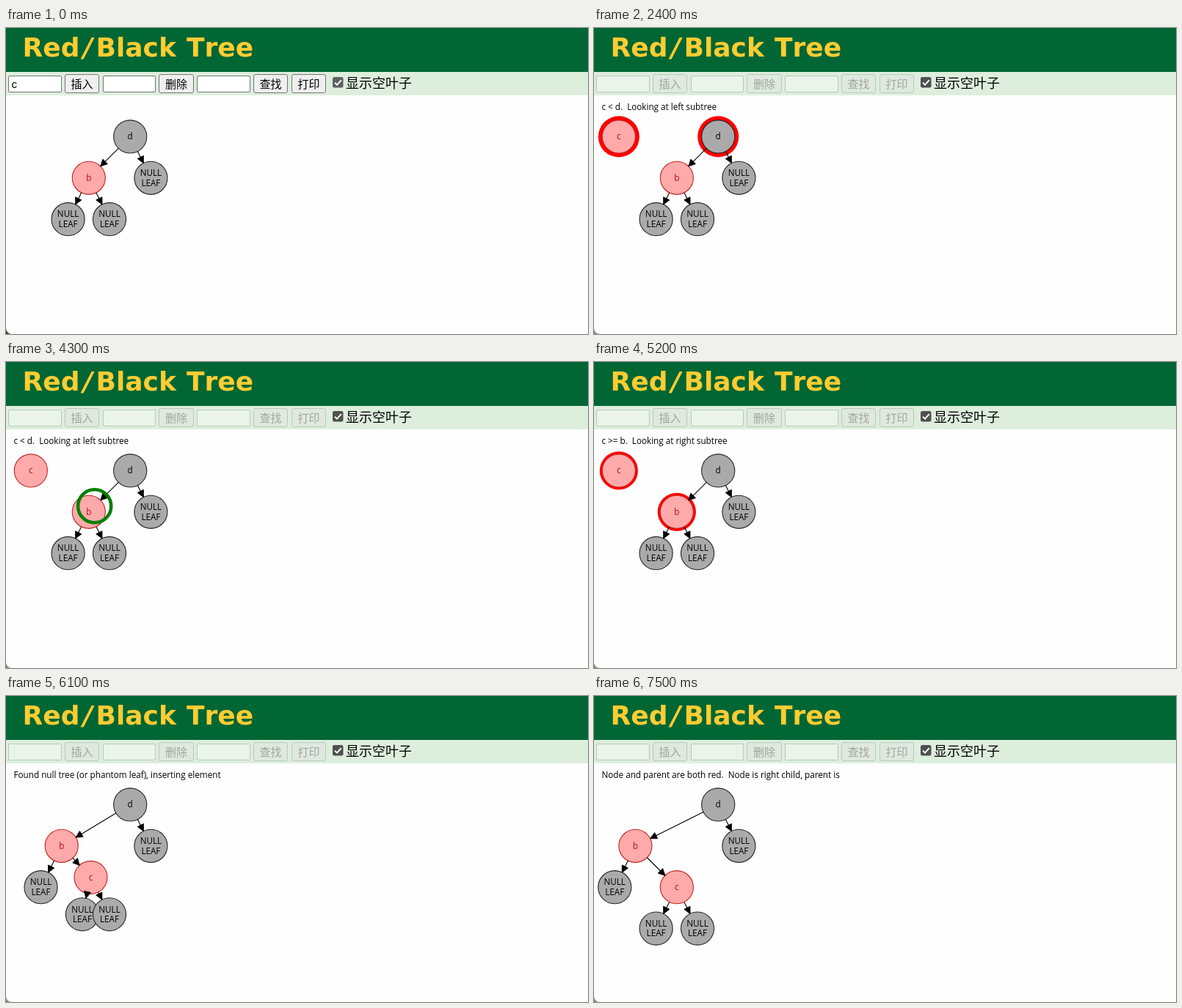
Write an HTML page that moves like this. It is 793x418 px and loops after 8 s.

```html
<!DOCTYPE html>
<html lang="zh">
<head>
<meta charset="utf-8">
<title>Red/Black Tree</title>
<style>
html, body { margin: 0; width: 100%; height: 100%; overflow: hidden; background: #fefefe; }
svg { display: block; width: 793px; height: 418px; }
text { white-space: pre; }
.title { font: bold 36px "DejaVu Sans", sans-serif; font-kerning: none; fill: #fc3; }
.slash { font-style: oblique; }
.ui { font: 15px "Noto Sans CJK SC", "Noto Sans CJK", sans-serif; }
.check { font: 18px "Noto Sans CJK SC", "Noto Sans CJK", sans-serif; }
.field { font: 15px "Liberation Sans", sans-serif; }
.tree { font: 11.7px "Open Sans", "Noto Sans", sans-serif; }
.mid { text-anchor: middle; }
</style>
</head>
<body>
<svg viewBox="0 0 793 418">
  <rect width="793" height="418" fill="#fefefe"/>
  <rect width="793" height="60" fill="#063"/>
  <rect y="60" width="793" height="32" fill="#ded"/>
  <text class="title" y="39"><tspan x="22.5">Red</tspan><tspan class="slash" x="105">/</tspan><tspan x="122.5">Black</tspan><tspan x="246">Tree</tspan></text>
  <g id="toolbar"></g>
  <g id="tree" class="tree"></g>
  <path id="corner" d="M0 410A8 8 0 0 0 8 418H0Z"/>
</svg>
<script>
const LOOP = 8000, TICK = 100;
const SCALE = 1.128, TOP = 92, RADIUS = 20 * SCALE;
const START = 1400, COMPARE_D = 2390, DESCEND = 3440, COMPARE_B = 4440, INSERT = 5443, FIX = 7500;
const MOVE_TIME = 1000, MOVE_STEPS = 32;
const RED = { fill: '#faa', line: '#c42525', ink: '#b80c0c' };
const BLACK = { fill: '#aaa', line: '#282828', ink: '#000' };

const byId = id => document.getElementById(id);
const clamp = v => Math.max(0, Math.min(1, v));
const lerp = (a, b, f) => a + (b - a) * f;
const at = (x, y) => ({ x: x * SCALE, y: TOP + y * SCALE });
const between = (p, q, f) => ({ x: lerp(p.x, q.x, f), y: lerp(p.y, q.y, f) });

function caption(t) {
  if (t < START) return '';
  if (t < COMPARE_D) return 'Inserting c';
  if (t < COMPARE_B) return 'c &lt; d.  Looking at left subtree';
  if (t < INSERT) return 'c &gt;= b.  Looking at right subtree';
  if (t < FIX) return 'Found null tree (or phantom leaf), inserting element';
  return 'Node and parent are both red.  Node is right child, parent is';
}

// Triangle wave between 3 and 7 units
function ringWidth(t) {
  const period = 1600, phase = ((t - 2830) % period + period) % period / period;
  return (3 + 8 * Math.abs(phase - .5)) * SCALE;
}

// Two moves pull on the node in every step; the second one wins at the end
function insertedPosition(f) {
  let p = at(30, 50);
  const targets = [at(125, 150), at(100, 150)];
  const steps = Math.round(f * MOVE_STEPS);
  for (let i = 0; i < steps; i++)
    for (const target of targets) p = between(p, target, 1 / (MOVE_STEPS - i));
  return p;
}

function circle(p, r, attrs) {
  return `<circle cx="${p.x}" cy="${p.y}" r="${r}" ${attrs}/>`;
}

function label(p, lines, color) {
  return lines.map((line, i) => {
    const y = p.y + 4 + (i - (lines.length - 1) / 2) * 13.5;
    return `<text class="mid" x="${p.x}" y="${y}" fill="${color}">${line}</text>`;
  }).join('');
}

function node({ p, text, look = BLACK, lit }, t) {
  const ring = lit ? circle(p, RADIUS + ringWidth(t), 'fill="#f00"') : '';
  return ring + circle(p, RADIUS, `fill="${look.fill}" stroke="${look.line}" stroke-width="${SCALE}"`)
    + label(p, text.split(' '), look.ink);
}

function edge(from, to) {
  const dx = to.x - from.x, dy = to.y - from.y, d = Math.hypot(dx, dy) || 1;
  const ux = dx / d, uy = dy / d;
  const head = { x: to.x - ux * RADIUS, y: to.y - uy * RADIUS };
  const back = { x: head.x - ux * 8 * SCALE, y: head.y - uy * 8 * SCALE };
  const w = 4 * SCALE;
  return `<path d="M${from.x + ux * RADIUS} ${from.y + uy * RADIUS}L${head.x} ${head.y}" stroke="#000" stroke-width="${SCALE}"/>`
    + `<path d="M${head.x} ${head.y}L${back.x - uy * w} ${back.y + ux * w}L${back.x + uy * w} ${back.y - ux * w}Z" stroke="#000"/>`;
}

function drawTree(t) {
  const f = clamp((t - INSERT) / MOVE_TIME), inserted = t >= INSERT;
  const onD = t >= COMPARE_D && t < DESCEND, onB = t >= COMPARE_B && t < INSERT;
  const leaf = p => ({ p, text: 'NULL LEAF' });
  const d = { p: at(150, 50), text: 'd', lit: onD };
  const b = { p: between(at(100, 100), at(50, 100), f), text: 'b', look: RED, lit: onB };
  const c = { p: insertedPosition(f), text: 'c', look: RED, lit: onD || onB };
  const dRight = leaf(at(175, 100));
  const bLeft = leaf(between(at(75, 150), at(25, 150), f));
  const lastLeaf = leaf(between(at(125, 150), at(125, 200), f));
  const nodes = [d, dRight, b, bLeft], edges = [[d, b], [d, dRight], [b, bLeft]];

  if (t >= START) nodes.push(c);
  if (inserted) {
    const cLeft = leaf(between(at(125, 150), at(75, 200), f));
    nodes.push(cLeft);
    edges.push([b, c], [c, cLeft], [c, lastLeaf]);
  } else {
    edges.push([b, lastLeaf]);
  }
  nodes.push(lastLeaf);
  nodes.sort((m, n) => !!m.lit - !!n.lit);

  let out = `<text x="10.5" y="112">${caption(t)}</text>`;
  out += nodes.map(n => node(n, t)).join('');
  out += edges.map(([m, n]) => edge(m.p, n.p)).join('');
  if (t >= DESCEND && t < COMPARE_B) {
    const p = between(d.p, at(100, 100), clamp((t - DESCEND) / MOVE_TIME));
    out += circle(p, RADIUS, `fill="none" stroke="#008000" stroke-width="${4 * SCALE}"`);
  }
  return out;
}

function box(x, y, w, h, r, fill, stroke) {
  return `<rect x="${x + .5}" y="${y + .5}" width="${w - 1}" height="${h - 1}" rx="${r}" fill="${fill}" stroke="${stroke}"/>`;
}

function hovered(t) {
  if (t < 100) return 'check';
  if (t < 200) return '查找';
  if (t < 300) return '删除';
  return t >= 500 && t < START ? '插入' : '';
}

function drawToolbar(t) {
  const off = t >= START, hover = hovered(t);
  const border = off ? '#b9cab9' : '#767676';
  const field = (x, w) => box(x, 65, w, 23, 1.5, off ? '#ebf4eb' : '#fff', border);
  const button = (x, w, text) => {
    const over = text === hover;
    return box(x, 63, w, 26, 2.5, off ? '#dfe9df' : over ? '#e5e5e5' : '#efefef', over ? '#4f4f4f' : border)
      + `<text class="ui mid" x="${x + w / 2}" y="82" fill="${off ? '#9fa69f' : '#000'}">${text}</text>`;
  };
  return field(3, 73) + field(132, 72) + field(260, 73)
    + (off ? '' : '<text class="field" x="7.5" y="82">c</text>')
    + button(80, 47, '插入') + button(208, 48, '删除') + button(337, 47, '查找') + button(389, 47, '打印')
    + `<rect x="445" y="67" width="14.5" height="14.5" rx="2.5" fill="${hover === 'check' ? '#616161' : '#505050'}"/>`
    + '<path d="M448 74.6l3 3 5.8-6.4" fill="none" stroke="#fff" stroke-width="2"/>'
    + '<text class="check" x="463" y="82">显示空叶子</text>';
}

function render(time) {
  const t = Math.floor(time % LOOP / TICK) * TICK;
  byId('toolbar').innerHTML = drawToolbar(t);
  byId('tree').innerHTML = drawTree(t);
  byId('corner').setAttribute('fill', t < 1000 ? '#444' : '#8c8c8c');
}

const begin = performance.now();
function frame() {
  render(performance.now() - begin);
  requestAnimationFrame(frame);
}
frame();
</script>
</body>
</html>
```
